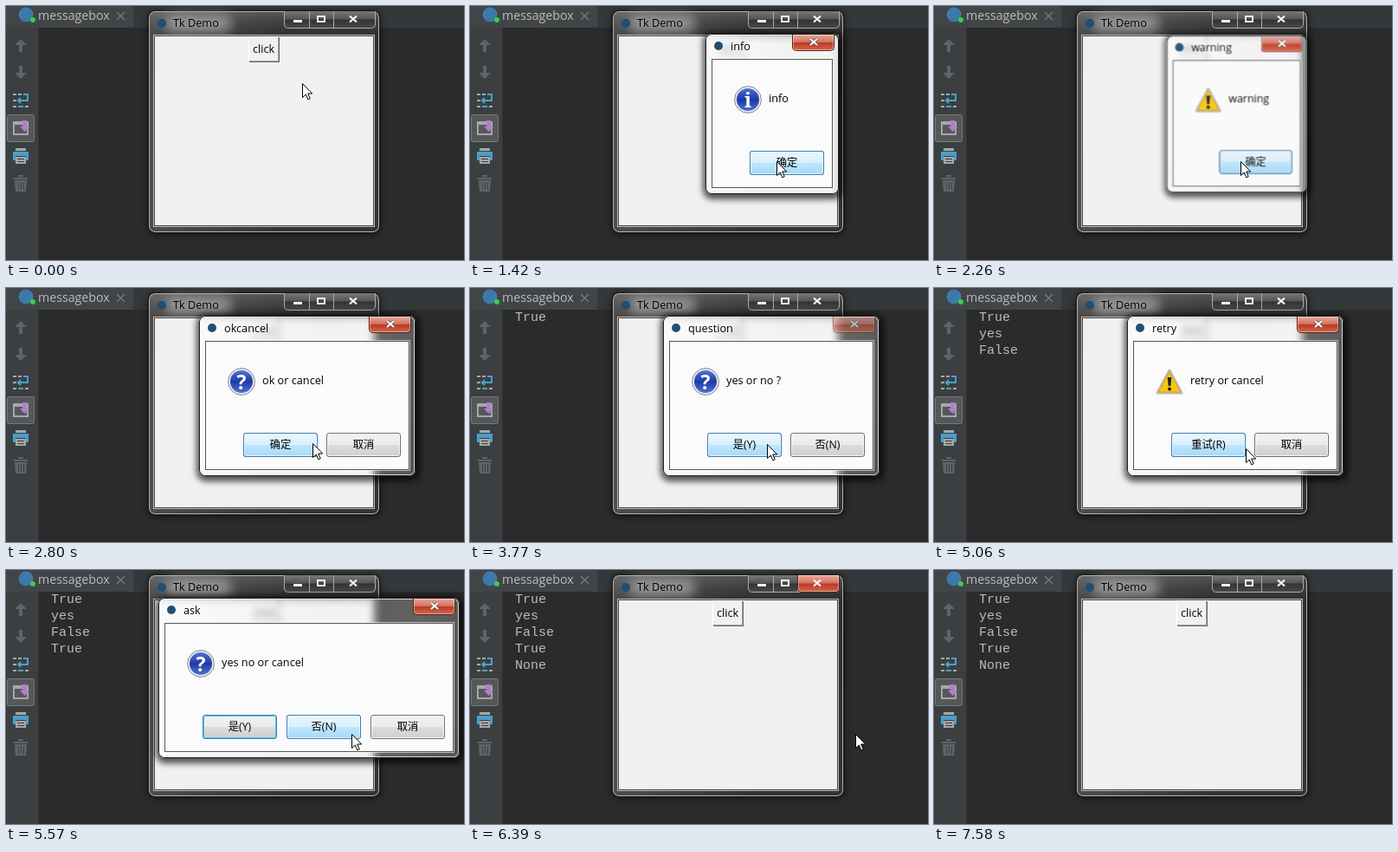
These frames come from a looping animation (529x293 px, 7680 ms). An HTML page:

```html
<!DOCTYPE html>
<html lang="en">
<head>
<meta charset="utf-8">
<title>Message boxes</title>
<style>
html, body { margin: 0; width: 100%; height: 100%; overflow: hidden; background: #2b2b2b; }
#stage { position: relative; width: 529px; height: 293px; overflow: hidden; background: #2b2b2b;
  font: 12.7px/16px "Open Sans", "Noto Sans", "Noto Sans CJK SC", "Noto Sans CJK", sans-serif; color: #000; }
#stage * { position: absolute; box-sizing: border-box; white-space: pre; }
#stage svg * { position: static; }
.ide { left: 0; top: 0; }
.tab { left: 37px; top: 2px; font-size: 14.2px; line-height: 18px; color: #bbb; }
.out { left: 52px; font: 15px/19px "Liberation Mono", monospace; color: #bbb; }
.win { border-radius: 7px; }
#main { left: 165px; top: 6px; width: 266px; height: 255px;
  background: linear-gradient(90deg, #fff2, #fff0 60%), linear-gradient(#555 0, #404040 12px, #2e2e2e 28px, #333 100%);
  box-shadow: inset 0 0 0 1px #b4b4b4, 0 0 0 1px #151515, 0 1px 7px 2px #0007; }
#main .glow { left: 18px; top: 3px; width: 78px; height: 22px; border-radius: 11px;
  background: #a5a5a5b0; filter: blur(6px); }
.client { box-shadow: 0 0 0 1px #444, 0 0 0 2px #bbb; }
#main .client { left: 7px; top: 29px; width: 252px; height: 218px; background: #f0f0f0; }
.tk { left: 10px; top: 9px; border-radius: 50%; width: 10px; height: 10px; background: #1f4f74; }
.bar { left: 156px; top: 0; width: 106px; height: 20px; border: 1px solid #aaa; border-top: 0;
  border-radius: 0 0 5px 5px; background: linear-gradient(#777 0, #555 48%, #333 52%, #484848); }
.bar i { top: 0; width: 1px; height: 19px; background: #aaa; }
.close { right: 5px; top: 1px; width: 49px; height: 19px; border: 1px solid #5b211b; border-top: 0;
  border-radius: 0 0 5px 5px; background: linear-gradient(#e7a99d 0, #d3705f 48%, #b93a25 52%, #d4664a);
  box-shadow: inset 0 0 0 1px #fff6; }
#active { right: 4px; top: 0; height: 20px; }
.close.off { opacity: .55; }
.close svg { left: 50%; top: 3px; margin-left: -6px; }
#click { left: 115px; top: 29px; width: 36px; height: 30px; background: #f0f0f0;
  box-shadow: inset 1px 1px #fff, inset -1px -1px #696969, inset -2px -2px #a0a0a0; }
#click b { left: 5px; top: 6px; font-weight: 400; }
.dlg { top: 32px; height: 185px; opacity: 0; backdrop-filter: blur(4px);
  background: linear-gradient(100deg, #fffa, #ffffff38 50%, #fff4 80%, #ffffff30);
  box-shadow: inset 0 0 0 1px #1c1c1c, inset 0 0 0 2px #fffb, 1px 2px 7px 4px #000a; }
.dlg .client { left: 8px; right: 8px; top: 30px; bottom: 8px; background: #fbfbfb;
  box-shadow: 0 0 0 1px #555, 0 0 0 2px #fff9; }
.title { left: 29px; top: 6px; text-shadow: 0 0 6px #fff, 0 0 6px #fff, 0 0 10px #fff; }
.msg { left: 73px; top: 66px; }
.icon { left: 33px; top: 60px; }
.btn { top: 135px; width: 86px; height: 28px; font-size: 12.3px; line-height: 27px; text-align: center; }
.btn > * { inset: 0; border-radius: 3px; }
.face { border: 1px solid #707070; box-shadow: inset 0 0 0 1px #fffc;
  background: linear-gradient(#f2f2f2, #ebebeb 48%, #dcdcdc 52%, #cfcfcf); }
.first .face { border-color: #3c7fb1; box-shadow: inset 0 0 0 1px #46c8f0; }
.hot { border: 1px solid #3c7fb1; box-shadow: inset 0 0 0 1px #fffa;
  background: linear-gradient(#eaf6fd, #d9f0fc 48%, #bee6fd 52%, #a7d9f5); }
.down { border: 1px solid #2c628b; box-shadow: inset 0 1px 1px #2c628b88;
  background: linear-gradient(#e5f4fc, #c4e5f6 48%, #98d1ef 52%, #68b3db); }
#cursor { left: 0; top: 0; }
</style>
</head>
<body>
<div id="stage">
  <svg class="ide" width="529" height="293">
    <path fill="#35383a" d="M0 0H529V25H0Z"/>
    <path fill="#414547" d="M0 0H147V25H0Z"/>
    <path fill="#3c3f41" d="M0 25H37V293H0Z"/>
    <path fill="#323537" d="M37 25H38V293H37Z"/>
    <circle cx="23" cy="10" r="8.5" fill="#3d7aab"/>
    <circle cx="31" cy="16" r="3" fill="#35d04a"/>
    <path d="M128 7l9 9m0-9l-9 9" stroke="#777b7d" stroke-width="1.3"/>
    <path fill="#606466" d="M17 38l7 7h-5v8h-4v-8h-5zM17 84l7-7h-5v-8h-4v8h-5z"/>
    <g fill="none" stroke-width="2">
      <path stroke="#a4a8aa" d="M8 102h4M14 102h4M8 109h4M8 116h4M22 116h4"/>
      <path stroke="#4a9fc9" d="M20 102h5v7H14m3-3l-3 3l3 3M14 116h6"/>
    </g>
    <rect x="1.5" y="125.5" width="31" height="31" rx="2" fill="#55585a" stroke="#777a7c"/>
    <path fill="#a4a8aa" d="M8 133h18v16H8zm2 4v10h14v-10z" fill-rule="evenodd"/>
    <path fill="#b57cd0" d="M19 132h5v7h3l-5.5 6l-5.5-6h3z"/>
    <path fill="#a4a8aa" d="M11 164h12v3H11zM11 174h12v8H11z"/>
    <path fill="#4a9fc9" d="M8 168h18v10h-3v-5H11v5H8z"/>
    <path stroke="#3c3f41" d="M13 176.5h8M13 179.500h8"/>
    <path fill="#606466" d="M9 198h16v2H9zM14 195h6v2h-6zM10 201h14l-1 13H11z"/>
    <path stroke="#3c3f41" d="M14.5 203v9M17.5 203v9M20.5 203v9"/>
  </svg>
  <div class="tab">messagebox</div>

  <div id="main" class="win">
    <div class="glow"></div>
    <div class="tk"></div>
    <div class="title" style="left:28px;top:5px;text-shadow:0 0 5px #bbb">Tk Demo</div>
    <div class="bar"><i style="left:28px"></i><i style="left:56px"></i></div>
    <div class="close" id="active"></div>
    <svg style="left:156px;top:0" width="106" height="20" fill="none" stroke="#f4f4f4" stroke-width="2">
      <path d="M11 11.5h10" stroke-width="3"/>
      <rect x="39" y="6" width="8" height="6"/>
      <path d="M76 5.5l8 7m0-7l-8 7" stroke-width="2.3"/>
    </svg>
    <div class="client"></div>
    <div id="click"><b>click</b></div>
  </div>
</div>

<script>
const LOOP = 7680, STEP = 120, END = 6240;
const stage = document.getElementById('stage');
const active = document.getElementById('active');

function add(parent, cls, html = '', css = '') {
  const el = document.createElement('div');
  el.className = cls;
  el.innerHTML = html;
  el.style.cssText = css;
  parent.append(el);
  return el;
}

const disc = (id, dark, light, mark) => `<linearGradient id="${id}" x2="0" y2="1">
  <stop stop-color="${light}"/><stop offset=".5" stop-color="${dark}"/><stop offset="1" stop-color="${light}"/>
  </linearGradient><circle cx="16" cy="16" r="15.4" fill="#e8eaee" stroke="#848891"/>
  <circle cx="16" cy="16" r="13" fill="url(#${id})"/>${mark}`;
const glyph = (s, family) => `<text x="16" y="24.5" text-anchor="middle" fill="#fff"
  font-size="23" font-weight="700" font-family="${family}">${s}</text>`;
const icons = {
  info: disc('blue', '#1c37a8', '#4a72d8', glyph('i', 'Noto Serif, serif')),
  ask: disc('navy', '#1f3ba6', '#4f74d4', glyph('?', 'Open Sans, sans-serif')),
  error: disc('red', '#b81f14', '#e86a58',
    '<path d="M10 10l12 12m0-12L10 22" stroke="#fff" stroke-width="4"/>'),
  warn: `<path d="M16 3L30 29H2Z" fill="#fbd21c" stroke="#b9b9b9" stroke-width="3" stroke-linejoin="round"/>
    <path d="M16 5L28.5 28H3.5Z" fill="#f7c70f" stroke="#e0a800" stroke-linejoin="round"/>
    <path d="M13.7 11h4.6l-1 10h-2.6z" fill="#222"/><circle cx="16" cy="24.5" r="2" fill="#222"/>`
};
const cross = `<svg width="12" height="11"><path d="M2 2l8 7m0-7l-8 7" stroke="#544" stroke-width="3.6"/>
  <path d="M2 2l8 7m0-7l-8 7" stroke="#fff" stroke-width="2.2"/></svg>`;

const OK = '确定', CANCEL = '取消', YES = '是(Y)', NO = '否(N)';
const small = { x: 272, w: 154, buttons: [OK] };
const wide = { x: 223, w: 250, icon: 'ask', text: 'yes or no ?' };
const choice = { ...wide, buttons: [YES, NO], locked: true };

// Each box closes as the next one opens.
const dialogs = [
  { ...small, open: 910, title: 'info', icon: 'info' },
  { ...small, open: 1690, title: 'error', icon: 'error' },
  { ...small, open: 2260, title: 'warning', icon: 'warn', x: 267, w: 165 },
  { ...wide, open: 2650, title: 'okcancel', text: 'ok or cancel', buttons: [OK, CANCEL], prints: 'True' },
  { ...choice, open: 3620, title: 'question', prints: 'yes' },
  { ...choice, open: 4190, title: 'yesno', prints: 'False' },
  { ...wide, open: 4790, title: 'retry', text: 'retry or cancel', icon: 'warn',
    buttons: ['重试(R)', CANCEL], prints: 'True' },
  { open: 5420, x: 176, w: 348, title: 'ask', text: 'yes no or cancel', icon: 'ask',
    buttons: [YES, NO, CANCEL], prints: 'None' }
];

const lines = [];
dialogs.forEach((d, i) => {
  d.end = dialogs[i + 1]?.open ?? END;
  d.el = add(stage, 'dlg win', '', `left:${d.x}px;width:${d.w}px`);
  add(d.el, 'tk');
  add(d.el, 'title', d.title);
  add(d.el, d.locked ? 'close off' : 'close', cross);
  add(d.el, 'client');
  add(d.el, 'icon', `<svg width="32" height="32">${icons[d.icon]}</svg>`);
  add(d.el, 'msg', d.text ?? d.title);
  const rest = d.buttons.length - 1, pitch = (d.w - 154) / rest;
  d.buttons = d.buttons.map((label, k) => {
    const left = d.w - 103 - (rest - k && pitch * (rest - k));
    const el = add(d.el, k ? 'btn' : 'btn first', '', `left:${left}px`);
    add(el, 'face');
    const b = { x: d.x + left, hot: add(el, 'hot'), down: add(el, 'down') };
    add(el, 'label', label);
    return b;
  });
  if (d.prints) {
    const el = add(stage, 'out', d.prints, `top:${25 + 19 * lines.length}px`);
    lines.push({ el, at: d.end + STEP });
  }
});

const cursor = add(stage, '', `<svg width="14" height="21"><path fill="#fff" stroke="#000"
  d="M.5.5V16.5L4.3 13L6.8 18.8L9.2 17.8L6.7 12H11.7Z"/></svg>`);
cursor.id = 'cursor';

// Pointer moves: start time, number of steps, goal
const moves = [
  [0, 1, 342, 89], [400, 2, 302, 63], [1180, 3, 354, 179], [3200, 2, 343, 180], [4310, 3, 405, 180],
  [5060, 2, 345, 186], [5420, 2, 399, 189], [5720, 3, 445, 189], [6540, 1, 409, 181],
  [6690, 2, 364, 260], [6930, 1, 440, 300]
];
const easeOut = p => p * (2 - p);

function pointer(t) {
  let x = 0, y = 0;
  for (const [start, n, gx, gy] of moves) {
    if (t < start) break;
    const p = easeOut(Math.min(1, (Math.floor((t - start) / STEP) + 1) / n));
    x += (gx - x) * p;
    y += (gy - y) * p;
  }
  return [Math.round(x), Math.round(y)];
}

function drawDialog(d, t, x, y) {
  const shown = t >= d.open && t < d.end;
  const leaving = t >= d.end - STEP, entering = t < d.open + STEP;
  d.el.style.opacity = !shown ? 0 : leaving ? .5 : entering ? .93 : 1;
  d.el.style.transform = `scale(${leaving ? .96 : entering ? .98 : 1})`;
  const age = Math.max(0, t - d.open - 1.5 * STEP);
  const pulse = .35 - .35 * Math.cos(age / 90);
  d.buttons.forEach((b, k) => {
    const over = x >= b.x && x <= b.x + 86 && y >= 167 && y < 195;
    b.hot.style.opacity = over ? 1 : k ? 0 : pulse;
    b.down.style.opacity = over && t >= d.end - 2 * STEP ? 1 : 0;
  });
}

function draw() {
  const t = performance.now() % LOOP;
  const [x, y] = pointer(t);
  cursor.style.transform = `translate(${x}px, ${y}px)`;
  dialogs.forEach(d => drawDialog(d, t, x, y));
  lines.forEach(l => l.el.style.opacity = t >= l.at ? 1 : 0);
  const focused = (t >= 670 && t < dialogs[0].open) || (t >= END - STEP && t < 7580);
  active.style.opacity = focused ? 1 : 0;
  requestAnimationFrame(draw);
}
draw();
</script>
</body>
</html>
```
